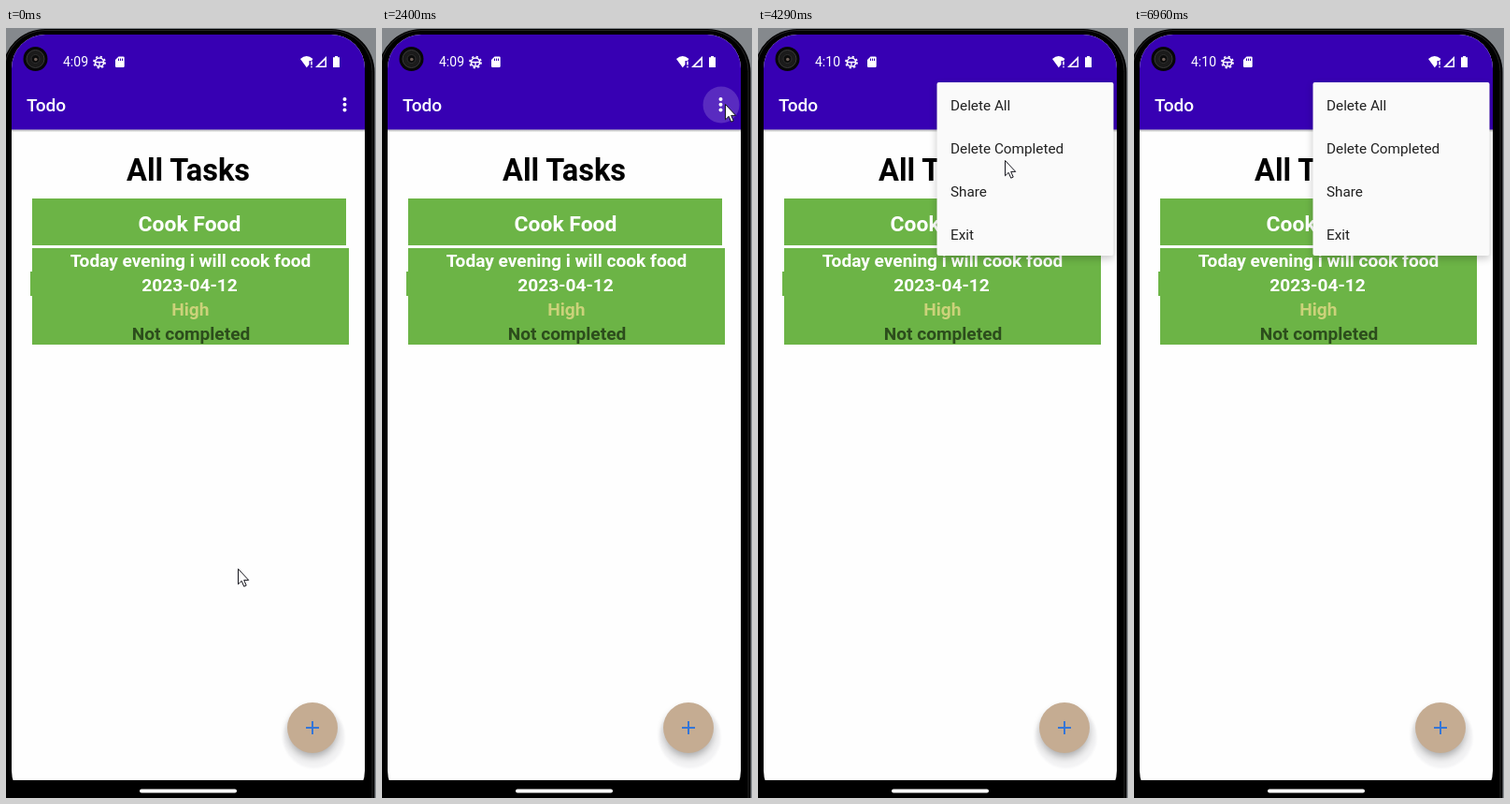
An HTML page that plays this animation: 396 px wide and 822 px high, repeating every 7.23 s.

```html
<!DOCTYPE html>
<html lang="en">
<head>
<meta charset="utf-8">
<title>Todo</title>
<style>
  html, body { margin: 0; width: 100%; height: 100%; overflow: hidden; background: #000; }
  svg { display: block; width: 396px; height: 822px; }
  text { font-family: Roboto, sans-serif; white-space: pre; }
  .white { fill: #fff; }
  .bold { font-weight: 700; text-anchor: middle; }
  .row { font-size: 19.1px; }
  .item { font-size: 15.3px; fill: #212121; }
</style>
</head>
<body>
<svg viewBox="0 0 396 822">
  <defs>
    <clipPath id="screen"><rect x="6" y="7" width="378" height="822" rx="36"/></clipPath>
    <clipPath id="menuClip"><rect id="menuClipBox" y="58"/></clipPath>
    <filter id="soft" x="-30%" y="-30%" width="160%" height="160%"><feGaussianBlur stdDeviation="4"/></filter>
    <filter id="softer" x="-30%" y="-30%" width="160%" height="160%"><feGaussianBlur stdDeviation="1.2"/></filter>
    <linearGradient id="barShadow" x2="0" y2="1">
      <stop stop-color="#000" stop-opacity=".28"/><stop offset="1" stop-color="#000" stop-opacity="0"/>
    </linearGradient>
  </defs>

  <!-- Phone body -->
  <rect width="396" height="822" fill="#85898d"/>
  <rect x="-4" y="1" width="398.5" height="880" rx="46" fill="#000"/>
  <rect x="-2" y="2.5" width="394" height="880" rx="44" fill="none" stroke="#242424"/>

  <g clip-path="url(#screen)">
    <rect x="6" y="7" width="378" height="796" fill="#fefefe"/>
    <rect x="6" y="7" width="378" height="101.500" fill="#3700b3"/>
    <rect x="6" y="108.500" width="378" height="3" fill="url(#barShadow)"/>
    <rect x="6" y="803" width="378" height="19" fill="#000"/>
  </g>
  <rect x="143" y="812.500" width="104" height="4" rx="2" fill="#fff"/>

  <!-- Camera -->
  <circle cx="31.500" cy="33" r="13" fill="#070707"/>
  <circle cx="31.500" cy="33" r="9.500" fill="#1b1b1b" stroke="#3a3a3a"/>
  <circle cx="31.500" cy="33" r="4.500" fill="#0b0b0b" stroke="#303030"/>
  <circle cx="31.800" cy="33.500" r="1.800" fill="#70625a"/>

  <!-- Status bar -->
  <text id="clock" class="white" x="61" y="41" font-size="14"></text>
  <g fill="none" stroke="#fff">
    <circle cx="100" cy="36.500" r="4.600" stroke-width="1.500"/>
    <circle cx="100" cy="36.500" r="6" stroke-width="1.800" stroke-dasharray="2.200 2.512"/>
    <path d="M96 36.500h8M100 36.500v4" stroke-width="1.300"/>
  </g>
  <path class="white" d="M120.500 30.500h5q1.200 0 1.200 1.200v9.100q0 1.200-1.200 1.200h-7.300q-1.200 0-1.200-1.200v-6.800z"/>
  <path d="M120.500 32.500v2.500m2-2.500v2.500m2-2.500v2.500" stroke="#3700b3"/>
  <path class="white" d="M315 33q6.700-5.800 13.500 0l-1.500 2h-2.500v4l-2.700 3.200z"/>
  <path d="M327 35.500v4m0 1.200v1.500" stroke="#fff" stroke-width="1.500"/>
  <path class="white" d="M343 30v12h-12z"/>
  <path d="M341.500 34v6.500h-6.500z" fill="#3700b3"/>
  <path class="white" d="M352 30h3v1.300h2v10.700h-7v-10.700h2z"/>

  <!-- Toolbar -->
  <text class="white" x="22" y="89" font-size="19.100" font-weight="500">Todo</text>
  <circle id="ripple" cx="363" cy="82" fill="#fff"/>
  <g class="white">
    <circle cx="362.500" cy="76" r="2"/><circle cx="362.500" cy="81.800" r="2"/><circle cx="362.500" cy="87.600" r="2"/>
  </g>

  <!-- Task list -->
  <text class="bold" x="195" y="163" font-size="32.500">All Tasks</text>
  <path d="M28 182h336v50h-336zM28 235h339v103h-339v-52h-2v-26h2z" fill="#6cb446"/>
  <text class="bold white" x="196.500" y="216.500" font-size="22.900">Cook Food</text>
  <text class="bold row white" x="197.500" y="255">Today evening i will cook food</text>
  <text class="bold row white" x="196.500" y="281">2023-04-12</text>
  <text class="bold row" x="197.300" y="307" fill="#cbd27a">High</text>
  <text class="bold row" x="198" y="333" fill="#2c4d1c">Not completed</text>

  <!-- Add button -->
  <circle cx="329.500" cy="757" r="33" fill="#f3f3f4" filter="url(#softer)"/>
  <circle cx="328" cy="752" r="26" fill="#000" opacity=".3" filter="url(#soft)"/>
  <circle cx="328" cy="747" r="27" fill="#c5ac92"/>
  <path d="M321 747h14M328 740v14" stroke="#3476d8" stroke-width="2"/>

  <!-- Overflow menu -->
  <g id="menu">
    <rect id="menuShadow" y="61" fill="#000" opacity=".22" filter="url(#soft)"/>
    <rect id="menuBox" y="58" rx="2" fill="#fafafa"/>
    <g clip-path="url(#menuClip)"><g id="items"></g></g>
  </g>

  <path id="cursor" d="M.5.5v16.300l3.700-3.500 2.500 5.900 2.500-1.100-2.500-5.700h5z" fill="#fff" stroke="#15151d" stroke-linejoin="round"/>
</svg>
<script>
const LOOP = 7230;
const $ = id => document.getElementById(id);

// Bursts of activity: first change, last change, number of changes.
const bursts = [
  [280, 1240, 8], [1390, 1660, 3], [2250, 3240, 8], [3360, 4290, 8],
  [4440, 5370, 8], [5520, 6480, 8], [6600, 6960, 4]
];
const ticks = [0];
for (const [from, to, n] of bursts)
  for (let i = 0; i < n; i++) ticks.push(from + (to - from) * i / (n - 1));

// Pointer path: time, x, y.
const path = [
  [150, 248, 577], [1240, 370, 109], [1660, 367, 81], [2830, 367, 81],
  [3240, 347, 92], [4290, 264, 141], [4840, 319, 178], [5370, 198, 237],
  [5794, 235, 238], [6210, 268, 600], [6345, 307, 665], [6480, 307, 735],
  [6600, 77, 685], [6840, 78, 675]
];

const ease = u => u * u * (3 - 2 * u);

function pointerAt(t) {
  const next = path.findIndex(p => p[0] > t);
  if (next === 0) return path[0].slice(1);
  if (next < 0) return path[path.length - 1].slice(1);
  const [t0, x0, y0] = path[next - 1], [t1, x1, y1] = path[next];
  const u = ease((t - t0) / (t1 - t0));
  return [x0 + (x1 - x0) * u, y0 + (y1 - y0) * u].map(Math.round);
}

function setAttrs(id, attrs) {
  for (const key in attrs) $(id).setAttribute(key, attrs[key]);
}

["Delete All", "Delete Completed", "Share", "Exit"].forEach((label, i) => {
  const text = document.createElementNS("http://www.w3.org/2000/svg", "text");
  text.setAttribute("class", "item");
  text.setAttribute("x", 206);
  text.setAttribute("y", 87.5 + 46.2 * i);
  text.textContent = label;
  $("items").append(text);
});

function render(time) {
  // Hold the picture between ticks; the slack absorbs uneven tick spacing.
  const t = ticks.filter(k => k <= time + 13).pop();

  $("clock").textContent = t < 3880 ? "4:09" : "4:10";

  const rippling = t >= 2250 && t < 2660;
  setAttrs("ripple", { r: t < 2380 ? 14 : 19.5, opacity: rippling ? 0.17 : 0 });

  const opening = t < 2800;
  const left = opening ? 202 : 191.5;
  const box = { x: left, width: 380.5 - left, height: opening ? 174 : 185 };
  for (const id of ["menuBox", "menuShadow", "menuClipBox"]) setAttrs(id, box);
  setAttrs("items", { transform: opening ? "translate(5 -6)" : "" });
  setAttrs("menu", { visibility: t >= 2660 ? "visible" : "hidden" });

  setAttrs("cursor", {
    transform: `translate(${pointerAt(t)})`,
    visibility: t >= 6950 ? "hidden" : "visible"
  });
}

function frame() {
  render(performance.now() % LOOP);
  requestAnimationFrame(frame);
}
frame();
</script>
</body>
</html>
```
